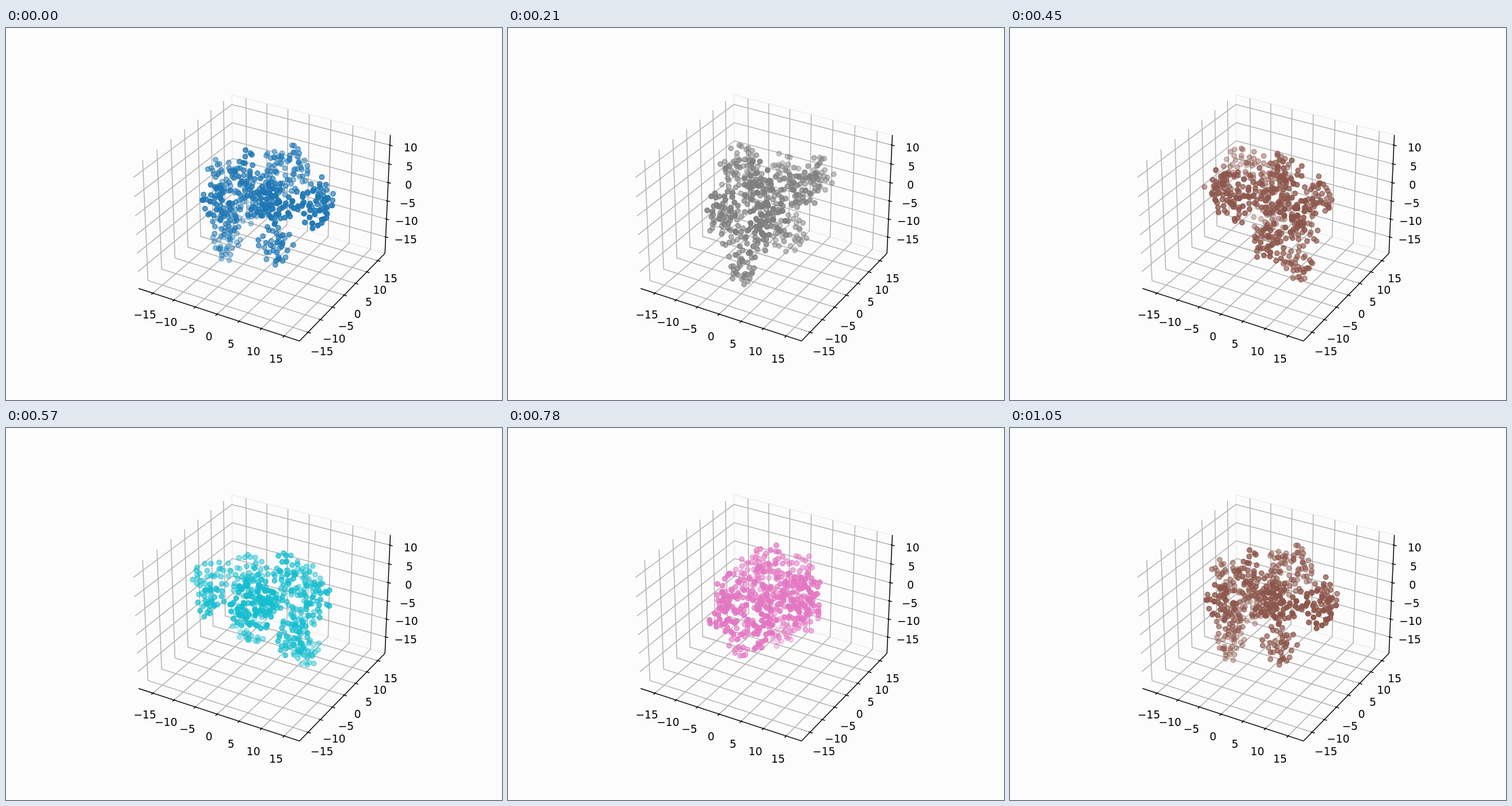
Write an HTML page with a canvas that moves like this. It is 864x648 px and loops after 1080 ms.

```html
<!DOCTYPE html>
<html lang="en">
<head>
<meta charset="utf-8">
<title>Rotating 3D scatter</title>
<style>
html, body { margin: 0; width: 100%; height: 100%; overflow: hidden; background: #fcfcfc; }
svg, canvas { position: absolute; left: 0; top: 0; width: 864px; height: 648px; }
text { font: 18.75px "DejaVu Sans", sans-serif; text-anchor: middle; }
path { fill: none; stroke-width: 1.5; }
</style>
</head>
<body>
<svg id="axes" viewBox="0 0 864 648"></svg>
<canvas id="plot" width="864" height="648"></canvas>
<script>
const STEP = 30, STEPS = 36, COUNT = 480, GAP = 8.5;
const COLORS = ['#1f77b4', '#ff7f0e', '#2ca02c', '#d62728', '#9467bd',
  '#8c564b', '#e377c2', '#7f7f7f', '#bcbd22', '#17becf'];

// Camera: azimuth -60, elevation 30, distance 10.
const COS = Math.sqrt(3) / 2;
function view(right, near, z) {
  const depth = COS * near + 0.5 * z;
  const k = 2697 / (10 - depth);
  return { x: 449.5 + k * right, y: 320.5 - k * (COS * z - 0.5 * near), depth };
}
const project = ([x, y, z]) => view(COS * x + 0.5 * y, 0.5 * x - COS * y, z);

// Axes box
const svg = document.getElementById('axes');
function add(tag, attrs, text) {
  const el = document.createElementNS('http://www.w3.org/2000/svg', tag);
  for (const key in attrs) el.setAttribute(key, attrs[key]);
  if (text !== undefined) el.textContent = text;
  svg.appendChild(el);
}
function line(color, ...pts) {
  const d = pts.map(project).map(p => p.x.toFixed(2) + ' ' + p.y.toFixed(2)).join('L');
  add('path', { d: 'M' + d, stroke: color });
}
function label(value, pos, drop) {
  const { x, y } = project(pos);
  add('text', { x, y: y + drop }, String(value).replace('-', '\u2212'));
}

const S = 0.5952, H = 0.4464, PAD = 0.1;
const TICK_IN = 0.0095, TICK_OUT = 0.019;
const GRID = '#b0b0b0', EDGE = '#ececec', INK = '#000';
const xAt = v => 0.0016 + 0.03236 * v;
const yAt = v => 0.0005 + 0.0324 * v;
const zAt = v => 0.0965 + 0.02767 * v;
const range = (from, to) => Array.from({ length: (to - from) / 5 + 1 }, (_, i) => from + 5 * i);
const ticks = range(-15, 15), zTicks = range(-15, 10);

line(EDGE, [-S, S, -H], [-S, S, H], [S, S, H]);
line(EDGE, [-S, S, -H], [S, S, -H]);
for (const v of ticks) {
  const x = xAt(v), y = yAt(v);
  line(GRID, [x, -S, -H], [x, S, -H], [x, S, H]);
  line(GRID, [S, y, -H], [-S, y, -H], [-S, y, H]);
}
for (const v of zTicks) line(GRID, [-S, -S, zAt(v)], [-S, S, zAt(v)], [S, S, zAt(v)]);
line(INK, [-S, -S, -H], [S, -S, -H]);
line(INK, [S, -S, -H], [S, S, -H]);
line(INK, [S, S, -H], [S, S, H]);
for (const v of ticks) {
  const x = xAt(v), y = yAt(v);
  line(INK, [x, TICK_IN - S, -H], [x, -S - TICK_OUT, -H]);
  line(INK, [S - TICK_IN, y, -H], [S + TICK_OUT, y, -H]);
  label(v, [x, -S - PAD, -H - PAD], 9.1);
  label(v, [S + PAD, y, -H - PAD], 9.1);
}
for (const v of zTicks) {
  const z = zAt(v);
  line(INK, [S - TICK_IN, S, z], [S + TICK_OUT, S, z]);
  label(v, [S + PAD, S + PAD, z], 15.4);
}

// Lobes of the cloud around the spin axis: right, back, up, radius
const LOBES = [
  [-15, 0, 8, 42], [100, -5, 8, 29], [83, -66, 14, 32], [35, 58, 22, 42],
  [20, -55, 18, 36], [-82, -28, 8, 33], [-75, 55, 15, 30], [-40, 5, 56, 30],
  [-68, 26, -92, 28], [-68, 5, -45, 27], [-30, 62, -42, 33], [18, -35, -62, 33]
];

let seed = 20;
function rand() {
  seed = (seed + 0x6D2B79F5) | 0;
  let t = Math.imul(seed ^ (seed >>> 15), 1 | seed);
  t = (t + Math.imul(t ^ (t >>> 7), 61 | t)) ^ t;
  return ((t ^ (t >>> 14)) >>> 0) / 4294967296;
}

// Larger lobes are chosen more often; points keep a small gap.
function sample() {
  const weight = lobe => lobe[3] ** 2;
  let pick = rand() * LOBES.reduce((sum, lobe) => sum + weight(lobe), 0);
  const [r, b, h, size] = LOBES.find(lobe => (pick -= weight(lobe)) < 0);
  const up = 2 * rand() - 1, turn = 2 * Math.PI * rand();
  const dist = size * Math.cbrt(rand()), flat = dist * Math.sqrt(1 - up * up);
  return [r + flat * Math.cos(turn), b + flat * Math.sin(turn), h + dist * up];
}
const cloud = [];
while (cloud.length < COUNT) {
  const p = sample();
  if (cloud.every(q => Math.hypot(p[0] - q[0], p[1] - q[1], p[2] - q[2]) > GAP)) cloud.push(p);
}
const points = cloud.map(([r, b, h]) => ({ r: r / 270, b: b / 270, z: h / 270 / COS + 0.0965 }));

const ctx = document.getElementById('plot').getContext('2d');
function draw(step) {
  const a = step * 2 * Math.PI / (STEPS - 1);
  const c = Math.cos(a), s = Math.sin(a);
  const dots = points
    .map(p => view(p.r * c - p.b * s + 0.0058, -(p.r * s + p.b * c) - 0.0067, p.z))
    .sort((p, q) => p.depth - q.depth);
  const far = dots[0].depth, span = dots[dots.length - 1].depth - far;
  ctx.clearRect(0, 0, 864, 648);
  ctx.fillStyle = ctx.strokeStyle = COLORS[step % 10];
  ctx.lineWidth = 1.875;
  for (const d of dots) {
    ctx.globalAlpha = 0.3 + 0.7 * (d.depth - far) / span;
    ctx.beginPath();
    ctx.arc(d.x, d.y, 4.19, 0, 2 * Math.PI);
    ctx.fill();
    ctx.stroke();
  }
}

const start = performance.now();
let shown = -1;
function tick() {
  const step = Math.floor((performance.now() - start) / STEP) % STEPS;
  if (step !== shown) draw(shown = step);
  requestAnimationFrame(tick);
}
tick();
</script>
</body>
</html>
```
